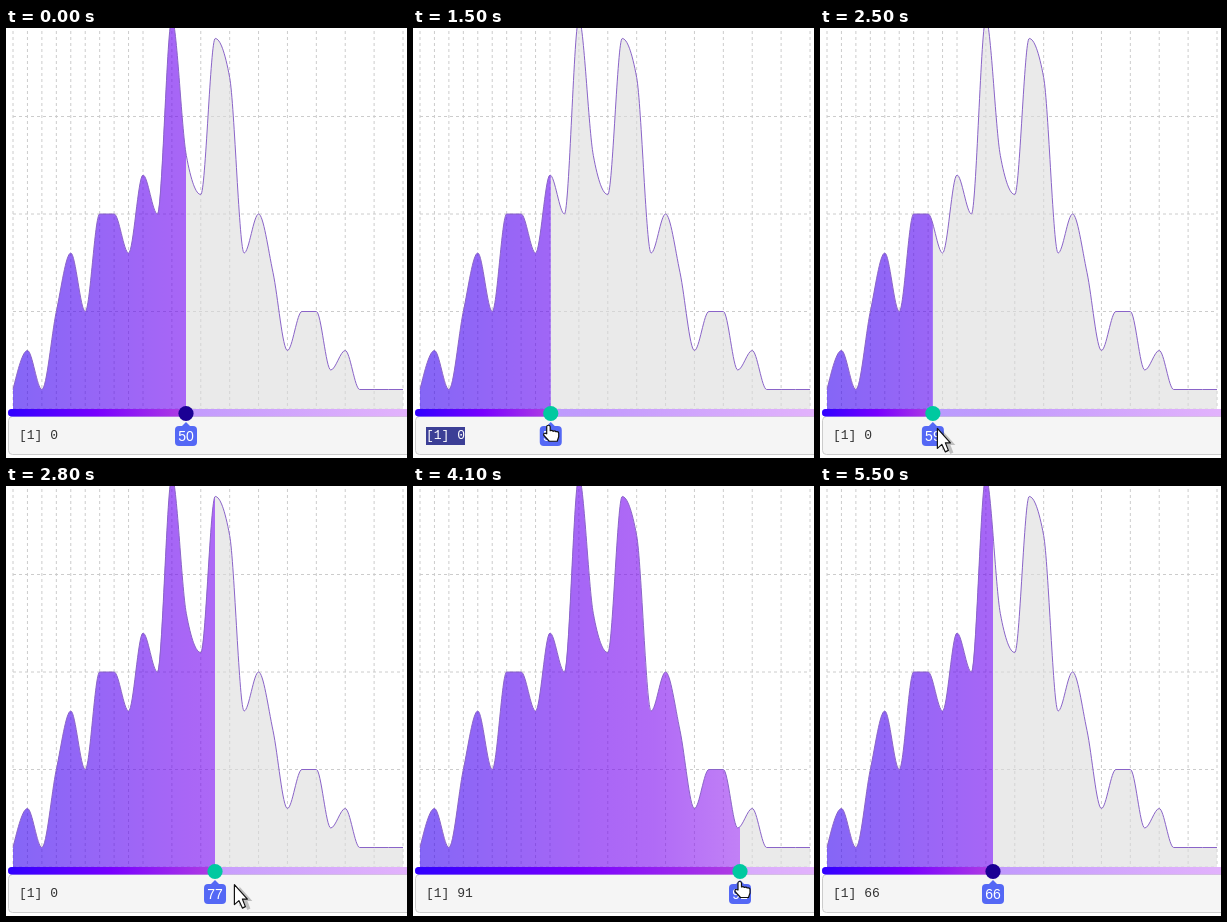
Recreate the animation shown at these times as an HTML page. Size 401 px wide and 430 px high, loop 6500 ms.

```html
<!DOCTYPE html>
<html lang="en">
<head>
<meta charset="utf-8">
<title>Density slider</title>
<style>
  html, body { margin: 0; width: 100%; height: 100%; overflow: hidden; background: #fff; }
  svg { display: block; width: 401px; height: 430px; }
  .grid { stroke: #ccc; stroke-dasharray: 3 3; }
  .mono { font: 13px "Liberation Mono", monospace; white-space: pre; }
  .badge { font: 14px "Liberation Sans", sans-serif; text-anchor: middle; fill: #fff; }
  .cursor { fill: #fff; stroke: #111; stroke-width: 1.2; stroke-linejoin: round; }
</style>
</head>
<body>
<svg viewBox="0 0 401 430">
  <defs>
    <linearGradient id="fill" gradientUnits="userSpaceOnUse" x1="7" y1="0" x2="397" y2="0">
      <stop offset="0" stop-color="#3400f0"/>
      <stop offset=".45" stop-color="#7000f0"/>
      <stop offset=".6" stop-color="#7c08f0"/>
      <stop offset="1" stop-color="#b048f0"/>
    </linearGradient>
    <linearGradient id="active" gradientUnits="userSpaceOnUse" x1="2" y1="0" x2="180" y2="0">
      <stop offset="0" stop-color="#3000ff"/>
      <stop offset=".5" stop-color="#7800ff"/>
      <stop offset="1" stop-color="#b13ee2"/>
    </linearGradient>
    <linearGradient id="rail" gradientUnits="userSpaceOnUse" x1="2" y1="0" x2="401" y2="0">
      <stop offset="0" stop-color="#ac9eff"/>
      <stop offset=".45" stop-color="#c29afd"/>
      <stop offset="1" stop-color="#e2b2fc"/>
    </linearGradient>
    <clipPath id="left"><rect id="leftBox" width="180" height="430"/></clipPath>
    <clipPath id="right"><rect id="rightBox" x="180" width="401" height="430"/></clipPath>
  </defs>

  <g id="grid" class="grid"></g>
  <path class="area" fill="#dcdcdc" fill-opacity=".6" clip-path="url(#right)"/>
  <path class="area" fill="url(#fill)" fill-opacity=".6" clip-path="url(#left)"/>
  <path id="line" fill="none" stroke="#8a64c8"/>

  <rect x="2.5" y="388.5" width="420" height="38" rx="4" fill="#f5f5f5" stroke="#ccc"/>
  <rect id="mark" x="13" y="399" width="39" height="18" fill="#3c3f96"/>
  <text id="out" class="mono" x="13" y="411">[1] 0</text>

  <rect x="2" y="381" width="420" height="7.5" rx="3.75" fill="url(#rail)"/>
  <rect id="track" x="2" y="381" width="178" height="7.5" rx="3.75" fill="url(#active)"/>
  <g id="knob">
    <path d="M0 394L4.5 398.5H-4.5Z" fill="#5468f5"/>
    <rect x="-11" y="398" width="22" height="20" rx="4" fill="#5468f5"/>
    <text id="value" class="badge" y="413">50</text>
    <circle id="thumb" cy="385.5" r="7.6"/>
  </g>

  <g id="arrow" class="cursor">
    <path d="M0 0V20L4.5 16 8 23.5 11 22 8 14.5H13Z" transform="translate(5 2)" fill="#000" stroke="none" opacity=".22"/>
    <path d="M0 0V20L4.5 16 8 23.5 11 22 8 14.5H13Z"/>
  </g>
  <path id="hand" class="cursor" d="M-2 9V2Q-2 .5 -.3 .5T1.5 2V6Q3 5 4.5 6.5 6 5.5 7.3 7 9.8 6.5 10 8.5V12L8.5 16.5H.5L-5 10.5Q-5.5 7.5 -2 9Z"/>
</svg>
<script>
(() => {
  const $ = id => document.getElementById(id);
  const set = (id, name, value) => $(id).setAttribute(name, value);
  const LOOP = 6500, STEP = 100;
  const X0 = 7, DX = 390 / 27, BASE = 381, UNIT = 19.5;
  const counts = [1, 3, 1, 5, 8, 5, 10, 10, 8, 12, 10, 20, 13, 11, 19, 17, 8, 10, 7, 3, 5, 5, 2, 3, 1, 1, 1, 1];

  // Monotone cubic through evenly spaced points
  function curve(ys) {
    const last = ys.length - 1;
    const slope = i => (ys[i + 1] - ys[i]) / DX;
    const tan = ys.map((_, i) => {
      if (i === 0) return slope(0) * 1.5;
      if (i === last) return slope(last - 1);
      const a = slope(i - 1), b = slope(i);
      return (Math.sign(a) + Math.sign(b)) * Math.min(Math.abs(a), Math.abs(b), Math.abs(a + b) / 4);
    });
    const h = DX / 3;
    let d = `M${X0} ${ys[0]}`;
    for (let i = 0; i < last; i++) {
      const x = X0 + i * DX;
      d += `C${x + h} ${ys[i] + tan[i] * h} ${x + 2 * h} ${ys[i + 1] - tan[i + 1] * h} ${x + DX} ${ys[i + 1]}`;
    }
    return d;
  }

  const outline = curve(counts.map(n => BASE - n * UNIT));
  set('line', 'd', outline);
  document.querySelectorAll('.area').forEach(p => p.setAttribute('d', `${outline}V${BASE}H${X0}Z`));

  let grid = '';
  for (let n = 0; n <= 20; n += 5) grid += `<path d="M${X0} ${BASE - n * UNIT}H397"/>`;
  for (let i = 0; i < 28; i += i < 9 ? 1 : 2) {
    grid += `<path d="M${X0 + i * DX} ${BASE - 20 * UNIT}V${BASE}"/>`;
  }
  $('grid').innerHTML = grid;

  // The three drags; every part eases out towards its own goal
  const drags = [
    { from: 1300, to: 2200, thumb: [77, 2.1], value: [52, 1], x: [72, 2.1], y: [401, 2] },
    { from: 2400, to: 3400, thumb: [327, 1.47], value: [91, 2], x: [327, 1.86], y: [395, 1] },
    { from: 4400, to: 5400, thumb: [173, 3.3], value: [66, 5], x: [171, 3.7], y: [390, 4] }
  ];

  function follow(part, first, t) {
    return drags.reduce((v, d) => {
      const p = Math.min(1, Math.max(0, (t - d.from) / (d.to - d.from)));
      const [goal, power] = d[part];
      return goal + (v - goal) * (1 - p) ** power;
    }, first);
  }

  function cursorKind(t) {
    if (t < 600 || t >= 5500) return '';
    return t < 900 || (t >= 2500 && t < 3200) ? 'arrow' : 'hand';
  }

  function draw(t) {
    const x = follow('thumb', 180, t);
    set('leftBox', 'width', x);
    set('rightBox', 'x', x);
    set('track', 'width', x - 2);
    set('active', 'x2', x);
    set('knob', 'transform', `translate(${x})`);
    $('value').textContent = Math.round(follow('value', 50, t));
    set('thumb', 'fill', t >= 900 && t < 5500 ? '#00c9a0' : '#1b0094');

    const selected = t >= 1500 && t < 2500;
    $('mark').style.display = selected ? '' : 'none';
    set('out', 'fill', selected ? '#fff' : '#333');
    $('out').textContent = '[1] ' + (t < 3300 ? 0 : t < 5100 ? 91 : 66);

    const kind = cursorKind(t);
    for (const id of ['arrow', 'hand']) $(id).style.display = id === kind ? '' : 'none';
    if (kind) {
      const rise = 33 * Math.max(0, 1 - (t - 600) / 400);
      const press = t < 1200 ? 0 : 7;
      set(kind, 'transform', `translate(${follow('x', 180, t)} ${follow('y', 387 + press, t) + rise})`);
    }
  }

  const start = performance.now();
  function tick() {
    const t = (performance.now() - start) % LOOP;
    draw(Math.floor(t / STEP) * STEP);
    requestAnimationFrame(tick);
  }
  tick();
})();
</script>
</body>
</html>
```
